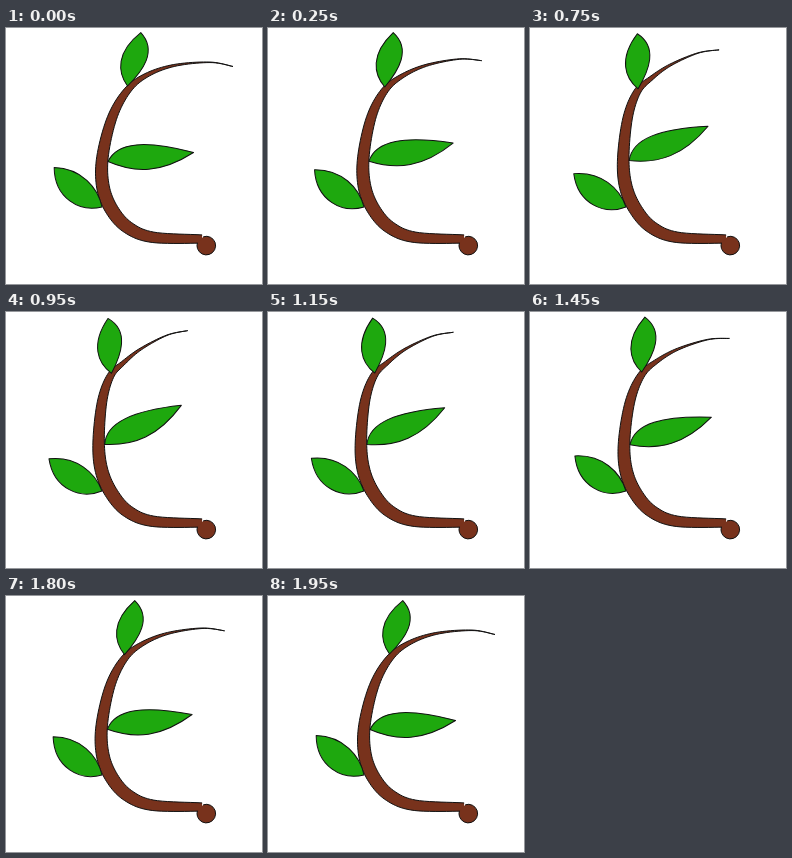
These frames come from a looping animation (256 by 256 pixels, 2000 ms). An HTML page with a canvas:

```html
<!DOCTYPE html>
<html>
<head>
<meta charset="utf-8">
<style>
html, body { margin: 0; width: 100%; height: 100%; overflow: hidden; background: #fff; }
canvas { display: block; }
</style>
</head>
<body>
<canvas id="stage" width="256" height="256"></canvas>
<script>
const ctx = document.getElementById('stage').getContext('2d');
const LOOP = 2000, STEP = 50, TOP = 20, LAST = 39;
const BROWN = '#78321c', GREEN = '#1ea80e';

// Centre line from tip to foot: x, y and, where it bends, the shift when raised.
const stem = [
  [227, 38.5, -41, -18],
  [204, 34.3, -39, -10],
  [168, 37.5, -30, -0.5],
  [140, 47.5, -21, 3.5],
  [121, 63, -15, 1],
  [106, 90, -9, 0],
  [96.5, 129, -3.5, 1],
  [97, 159, -1.2, 0],
  [106, 182],
  [122, 199.5],
  [147, 209.3],
  [196, 211]
];
const knob = { x: 200.3, y: 217.6, r: 9.3 };

// Sides are bezier handles along and across the leaf; angles in degrees.
const leaves = [
  { base: [121.5, 58, -14.5, 3], length: 55, angle: -76, swing: -16,
    left: [0.2, 0.24, 0.55, 0.35], right: [0.33, -0.2, 0.75, -0.38] },
  { base: [102, 133.5, -3, -1], length: 86, angle: -6, swing: -19,
    left: [0.13, 0.22, 0.47, 0.2], right: [0.3, -0.17, 0.6, -0.2] },
  { base: [96, 179, 0, 0], length: 62, angle: -140.5, swing: -7.5,
    left: [0.22, 0.3, 0.68, 0.38], right: [0.25, -0.2, 0.65, -0.27] }
];

const bend = ([x, y, dx = 0, dy = 0], p) => [x + dx * p, y + dy * p];
const stemWidth = s => 13 * Math.sin(Math.PI * s / 15.5) ** 2;

function paint(color) {
  ctx.fillStyle = color;
  ctx.fill();
  ctx.stroke();
}

// Catmull-Rom position at s, where whole numbers fall on the points.
function along(pts, s) {
  const end = pts.length - 1;
  const i = Math.min(Math.floor(s), end - 1), t = s - i;
  const [a, b, c, d] = [-1, 0, 1, 2].map(k => pts[Math.max(0, Math.min(end, i + k))]);
  return [0, 1].map(k => b[k] + t / 2 * (c[k] - a[k]
    + t * (2 * a[k] - 5 * b[k] + 4 * c[k] - d[k]
    + t * (3 * b[k] - a[k] - 3 * c[k] + d[k]))));
}

function drawStem(p) {
  const pts = stem.map(row => bend(row, p));
  const end = pts.length - 1, count = end * 10;
  const edge = (s, side) => {
    const [x, y] = along(pts, s);
    const [x0, y0] = along(pts, Math.max(0, s - 0.02));
    const [x1, y1] = along(pts, Math.min(end, s + 0.02));
    const k = side * stemWidth(s) / 2 / Math.hypot(x1 - x0, y1 - y0);
    return [x + (y1 - y0) * k, y - (x1 - x0) * k];
  };
  ctx.beginPath();
  for (let i = count; i >= 0; i--) ctx.lineTo(...edge(i / 10, 1));
  for (let i = 1; i <= count; i++) ctx.lineTo(...edge(i / 10, -1));
  paint(BROWN);
  ctx.beginPath();
  ctx.arc(knob.x, knob.y, knob.r, -1.9, 3.44);
  paint(BROWN);
}

function drawLeaf({ base, length, angle, swing, left, right }, p) {
  ctx.save();
  ctx.translate(...bend(base, p));
  ctx.rotate((angle + swing * p) * Math.PI / 180);
  const at = (u, v) => [u * length, -v * length];
  ctx.beginPath();
  ctx.moveTo(0, 0);
  ctx.bezierCurveTo(...at(left[0], left[1]), ...at(left[2], left[3]), length, 0);
  ctx.bezierCurveTo(...at(right[2], right[3]), ...at(right[0], right[1]), 0, 0);
  ctx.closePath();
  paint(GREEN);
  ctx.restore();
}

function draw(time) {
  const n = Math.floor((time % LOOP) / STEP);
  const u = n <= TOP ? n / TOP : (LAST - n) / (LAST - TOP);
  const p = 1.3 * u - 0.16 * u ** 4;
  ctx.fillStyle = '#fff';
  ctx.fillRect(0, 0, 256, 256);
  ctx.strokeStyle = '#111';
  ctx.lineWidth = 1;
  ctx.lineJoin = 'round';
  drawStem(p);
  leaves.forEach(leaf => drawLeaf(leaf, p));
}

const start = performance.now();
function tick() {
  draw(performance.now() - start);
  requestAnimationFrame(tick);
}
tick();
</script>
</body>
</html>
```
